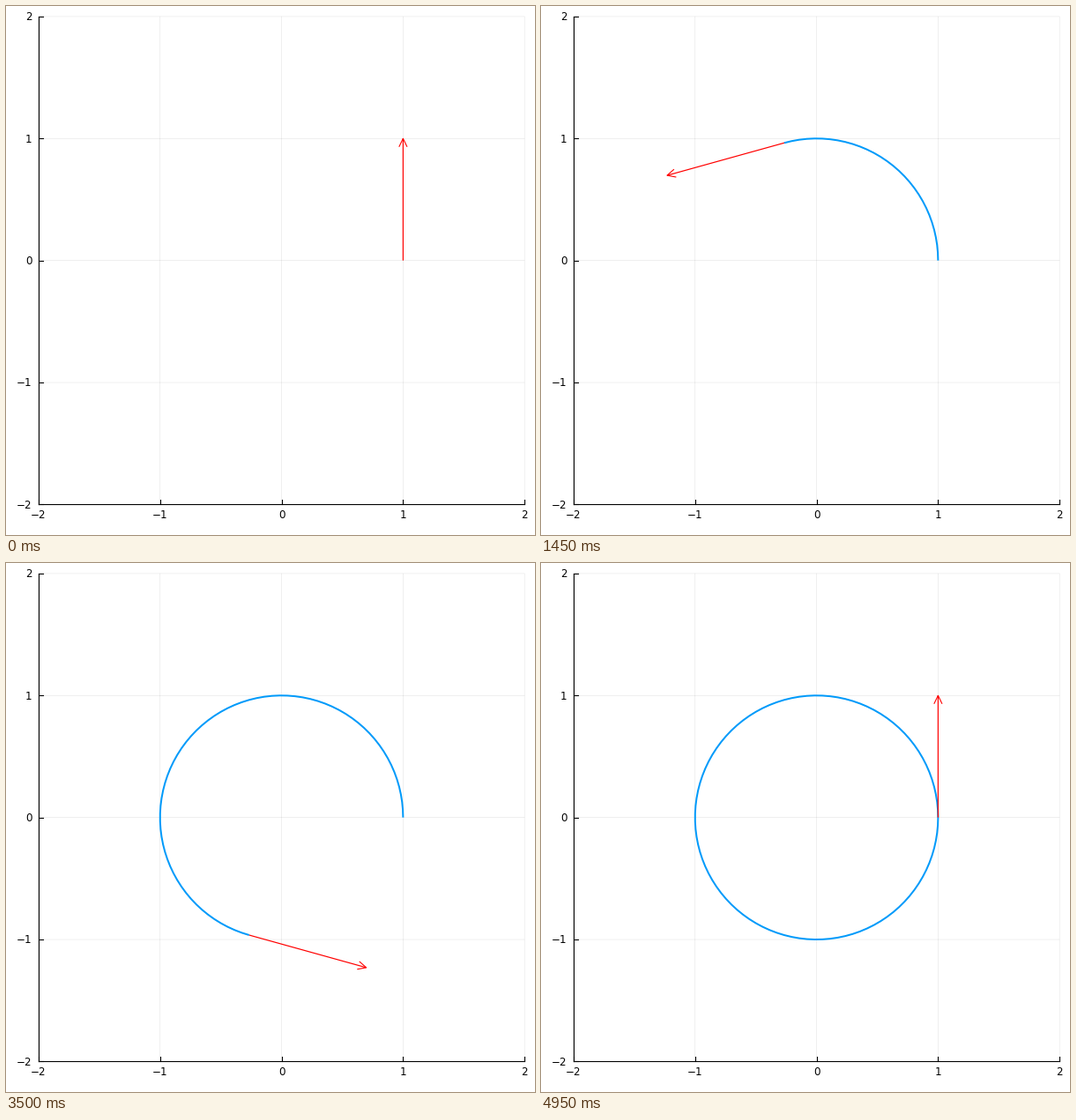
These frames come from a looping animation (600 by 600 pixels, 5000 ms). A matplotlib script:

```python
import numpy as np
import matplotlib.pyplot as plt
from matplotlib.animation import FuncAnimation

FRAMES = 100
PX = 0.72  # points per pixel at 100 dpi
LEFT, RIGHT, TOP, BOTTOM = 36.9, 588.2, 11.9, 565.4
HEAD_LENGTH, HEAD_HALF_WIDTH = 9.5, 4.6

plt.rcParams["font.family"] = "DejaVu Sans"

fig = plt.figure(figsize=(6, 6), dpi=100, facecolor="white")
ax = fig.add_axes([0, 0, 1, 1])
ax.set_xlim(0, 600)
ax.set_ylim(600, 0)
ax.axis("off")


def to_px(x, y):
    """Map plot coordinates (-2..2) to stage pixels."""
    return (LEFT + (x + 2) / 4 * (RIGHT - LEFT),
            BOTTOM - (y + 2) / 4 * (BOTTOM - TOP))


def line(xs, ys, color, width, **kw):
    return ax.plot(xs, ys, color=color, lw=width * PX, **kw)[0]


def draw_axes():
    for v in range(-2, 3):
        x, y = to_px(v, v)
        grid = dict(color="black", width=0.6, alpha=0.1, snap=False,
                    solid_capstyle="butt")
        line([x, x], [TOP, BOTTOM], **grid)
        line([LEFT, RIGHT], [y, y], **grid)
        line([x, x], [BOTTOM, BOTTOM - 5], "black", 1.1)
        line([LEFT, LEFT + 5], [y, y], "black", 1.1)
        label = str(v).replace("-", "\u2212")
        ax.text(x, 581.0, label, size=11.9 * PX, ha="center", va="baseline")
        ax.text(29.3, y + 4.4, label, size=11.9 * PX, ha="right",
                va="baseline")
    line([LEFT, LEFT], [TOP, BOTTOM], "black", 1.1)
    line([LEFT, RIGHT], [BOTTOM, BOTTOM], "black", 1.1)


draw_axes()
angles = np.linspace(0, 2 * np.pi, FRAMES)
path_x, path_y = to_px(np.cos(angles), np.sin(angles))

trail = line([], [], "#009afa", 2, snap=False, solid_capstyle="butt", zorder=3)
shaft = line([], [], "red", 1.2, snap=False, solid_capstyle="butt", zorder=4)
head = line([], [], "red", 1.1, snap=False, solid_capstyle="butt", zorder=4)


def update(i):
    c, s = np.cos(angles[i]), np.sin(angles[i])
    base = np.array(to_px(c, s))
    tip = np.array(to_px(c - s, s + c))
    along = (tip - base) / np.hypot(*(tip - base))
    side = np.array([-along[1], along[0]])
    back = tip - HEAD_LENGTH * along
    barbs = np.array([back + HEAD_HALF_WIDTH * side, tip,
                      back - HEAD_HALF_WIDTH * side])

    trail.set_data(path_x[:i + 1], path_y[:i + 1])
    shaft.set_data([base[0], tip[0]], [base[1], tip[1]])
    head.set_data(barbs[:, 0], barbs[:, 1])
    return trail, shaft, head


anim = FuncAnimation(fig, update, frames=FRAMES, interval=50,
                     repeat=True, repeat_delay=0)
plt.show()
```
